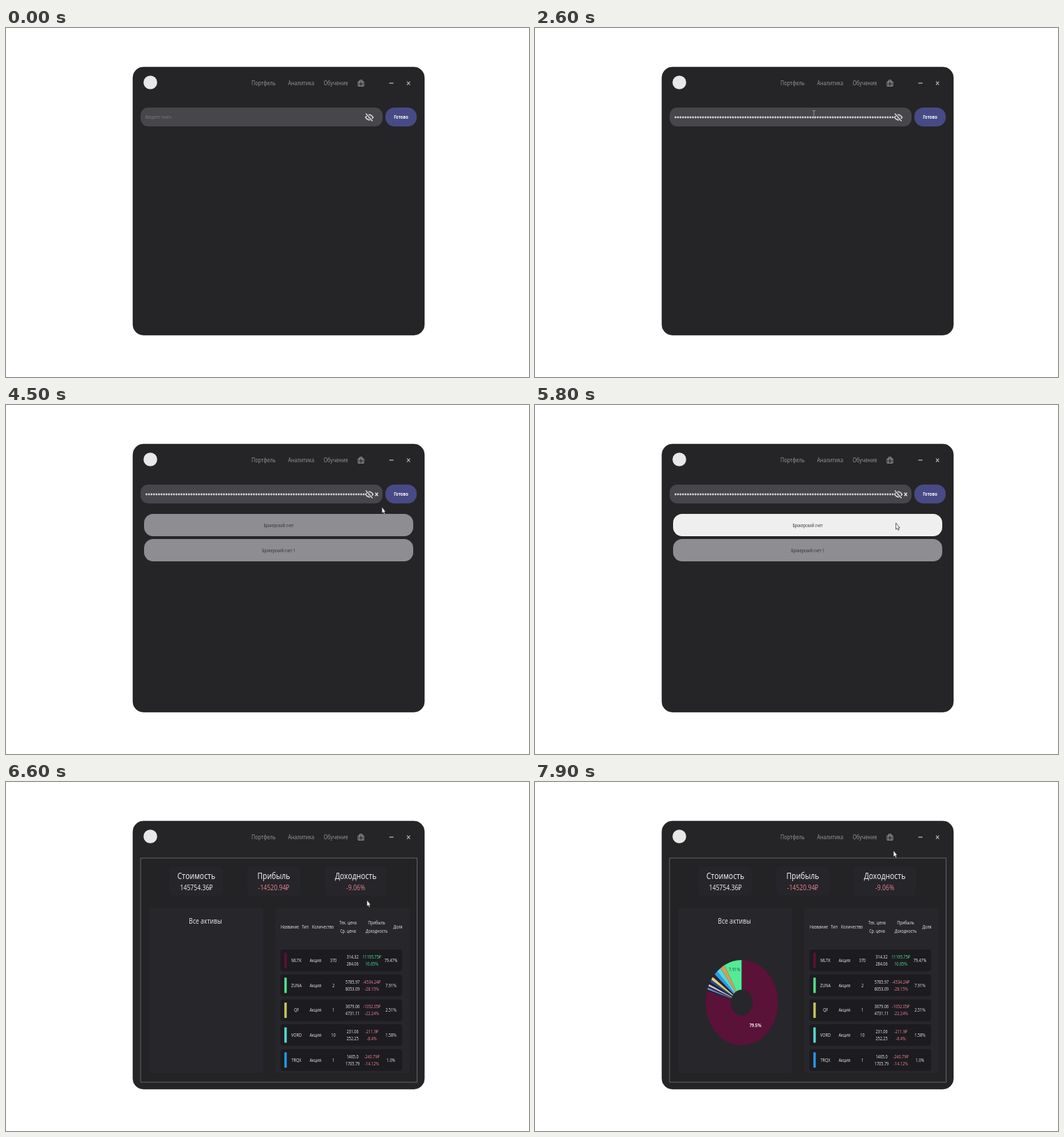
Animation of 750 by 500 pixels, one loop 8 s. Source, as an HTML page:

```html
<!DOCTYPE html>
<html lang="ru">
<head>
<meta charset="utf-8">
<style>
html, body { margin: 0; width: 100%; height: 100%; overflow: hidden; background: #fff; }
svg { display: block; width: 750px; height: 500px; }
text { font-family: "Noto Sans", "Open Sans", sans-serif; }
</style>
</head>
<body>
<svg id="stage" viewBox="0 0 750 500"></svg>
<script>
const SQUEEZE = 0.85; // the whole window is narrowed horizontally
const LOOP = 8000, STEP = 100;
const RED = '#d87f88', GREEN = '#4fd88c', LIGHT = '#dededf';

const text = (x, y, size, fill, str, anchor = 'middle', weight = 400) =>
  `<text transform="translate(${x} ${y}) scale(${SQUEEZE} 1)" font-size="${size}" fill="${fill}"
    text-anchor="${anchor}" font-weight="${weight}">${str}</text>`;
const box = (x, y, w, h, r, fill, extra = '') =>
  `<rect x="${x}" y="${y}" width="${w}" height="${h}" rx="${r}" fill="${fill}" ${extra}/>`;
const line = (d, color, width, extra = '') =>
  `<path d="${d}" fill="none" stroke="${color}" stroke-width="${width}" ${extra}/>`;
const group = (id, body) => `<g id="${id}">${body}</g>`;

function header() {
  const nav = [[352, 'Портфель'], [404.5, 'Аналитика'], [455.5, 'Обучение']];
  return box(182, 56, 418, 384, 15, '#252527', 'stroke="#1b1b1d" stroke-width=".6"') +
    `<circle cx="207" cy="78" r="9.8" fill="#e8e8e8"/>` +
    nav.map(([x, s]) => text(x, 82, 8.4, '#929294', s, 'start')).join('') +
    line('M505 77h8v6.2h-8zM507.3 77v-2.2h3.4v2.2M507.3 77v6M510.7 77v6', '#a0a0a2', 1) +
    line('M549.7 79h6', '#b5b5b7', 1.3) +
    line('M575 76.7l4.4 5M579.4 76.7l-4.4 5', '#b5b5b7', 1.1);
}

function login() {
  const eye = line('M515.5 128q5.5 -7.5 11 0q-5.5 7.5 -11 0z', '#dcdcde', 1.3) +
    `<ellipse cx="521" cy="128" rx="1.7" ry="2" fill="#dcdcde"/>` +
    line('M516.3 122.5l9.6 11', '#47464b', 3) + line('M516 122.5l9.6 11', '#e2e2e4', 1.2);
  return box(193, 114, 347, 27, 11, '#47464b') +
    group('hint', text(199.5, 130.2, 6.2, '#78777c', 'Введите токен', 'start')) +
    group('caret', line('M199.7 123v10', '#c4c4c6', 0.8)) +
    group('token', line('M201.5 128H514.5', '#d6d6d8', 2.8,
      'stroke-linecap="round" stroke-dasharray="0 3.58"')) + eye +
    group('clear', line('M529.5 125.6l4 4.8M533.5 125.6l-4 4.8', '#e8e8ea', 1.4)) +
    box(544, 114, 45, 27, 13, '#484a86', 'id="done"') +
    text(566.5, 130.4, 6.9, '#fff', 'Готово', 'middle', 700);
}

function accounts() {
  return ['Брокерский счет', 'Брокерский счет 1'].map((name, i) =>
    box(198, 156 + 36 * i, 386, 32, 13, '#8e8d91', `id="account${i}"`) +
    text(391, 174.6 + 36 * i, 6.2, '#343437', name)).join('');
}

function table() {
  const heads = [[407, 210, 'Название'], [429, 210, 'Тип'], [454.5, 210, 'Количество'],
    [490.5, 204, 'Тек. цена'], [490.5, 216, 'Ср. цена'],
    [531.5, 204, 'Прибыль'], [531.5, 216, 'Доходность'], [562, 210, 'Доля']];
  const rows = [
    ['#5a1238', 'MLTK', '370', '314.32', '284.06', '11195.75₽', '10.65%', '79.47%'],
    ['#52e58c', 'ZUNA', '2', '5785.97', '8053.09', '-4534.24₽', '-28.15%', '7.91%'],
    ['#c5c860', 'QF', '1', '3679.06', '4731.11', '-1052.05₽', '-22.24%', '2.51%'],
    ['#54dfd0', 'VORD', '10', '231.06', '252.25', '-211.9₽', '-8.4%', '1.58%'],
    ['#2a98e8', 'TRQX', '1', '1465.0', '1705.79', '-240.79₽', '-14.12%', '1.0%']];
  return heads.map(([x, y, s]) => text(x, y, 6.4, LIGHT, s, 'middle', 500)).join('') +
    rows.map(([color, name, count, now, mean, gain, rate, share], i) => {
      const y = 255.5 + 35.7 * i, tone = gain[0] === '-' ? RED : GREEN;
      const cell = (x, dy, s, fill = LIGHT) => text(x, y + dy + 2.4, 6.5, fill, s);
      return box(393.5, y - 15.5, 174.5, 31, 4, '#1c1b20') +
        box(399.2, y - 11, 3.4, 22, 0.5, color) +
        cell(416.5, 0, name) + cell(443.7, 0, 'Акция') + cell(469.5, 0, count) +
        cell(497, -5, now) + cell(497, 5, mean) +
        cell(524.5, -5, gain, tone) + cell(524.5, 5, rate, tone) + cell(552, 0, share);
    }).join('');
}

function pie() {
  const slices = [[7.91, '#52ec96'], [2.1, '#c9a25a'], [1.9, '#54d6e0'], [1.58, '#2f9be6'],
    [1.3, '#2a2233'], [1.2, '#d8cf7a'], [1, '#2c4a8a'], [0.9, '#20202a'], [0.8, '#c9c4dc'],
    [0.7, '#3b2a55'], [0.6, '#5fa8c8'], [0.54, '#1d2440'], [79.47, '#5a1238']];
  let end = 100;
  const arcs = slices.map(([share, color]) => {
    end -= share;
    return `<circle r="39.7" fill="none" stroke="${color}" stroke-width="42.6" pathLength="100"
      stroke-dasharray="${share} ${100 - share}" stroke-dashoffset="${-end}"/>`;
  }).join('');
  return `<g transform="translate(296.5 316) scale(${SQUEEZE} 1) rotate(-90)">${arcs}</g>` +
    text(286, 271, 7, '#285c43', '7.91%') + text(316, 350.6, 7, '#f0e8ec', '79.5%', 'middle', 600);
}

function portfolio() {
  const cards = [[234, 77, 273, 'Стоимость', '145754.36₽', '#e6e6e8'],
    [346, 76, 384, 'Прибыль', '-14520.94₽', RED],
    [457, 89, 501.5, 'Доходность', '-9.06%', RED]];
  return box(193, 109, 396.5, 321, 0, '#232225', 'stroke="#6b6b6d" stroke-width=".9"') +
    cards.map(([x, w, mid, title, value, color]) => box(x, 121, w, 42, 5, '#262529') +
      text(mid, 139, 12.2, '#ececee', title) + text(mid, 155, 10.2, color, value)).join('') +
    box(205, 180, 164, 237, 5, '#27262a') + box(386, 180, 193, 237, 5, '#27262a') +
    text(286, 202.5, 10.1, '#e2e2e4', 'Все активы') + table() + group('pie', pie());
}

document.getElementById('stage').innerHTML = header() + group('login', login()) +
  group('accounts', accounts()) + group('portfolio', portfolio()) +
  group('pointer', `<path d="M0 0V9.2L1.9 7.6L3.2 10.4L4.7 9.7L3.4 7H5.6Z"
    fill="#f6f6f6" stroke="#29292b" stroke-width=".7"/>`) +
  group('beam', line('M-2 -5.5h4M0 -5.5V5M-2 5h4', '#a9a9ac', 0.8));

const el = id => document.getElementById(id);
const show = (id, on) => el(id).setAttribute('visibility', on ? 'visible' : 'hidden');

// time, x, y of the mouse
const path = [[1600, 545, 81], [2000, 400, 124], [2700, 400, 124], [3300, 555, 130],
  [4200, 555, 130], [4500, 539, 146], [4800, 517.5, 169], [7200, 517.5, 169],
  [7700, 530, 122], [7900, 514, 98]];

function mouseAt(t) {
  const i = path.findIndex(p => p[0] > t);
  if (i < 0) return path[path.length - 1].slice(1);
  if (i === 0) return path[0].slice(1);
  const [t0, x0, y0] = path[i - 1], [t1, x1, y1] = path[i];
  const k = (t - t0) / (t1 - t0);
  return [x0 + (x1 - x0) * k, y0 + (y1 - y0) * k];
}

function draw(now) {
  const t = Math.floor(now % LOOP / STEP) * STEP;
  const [x, y] = mouseAt(t);
  const inside = (l, top, r, bottom) => x > l && x < r && y > top && y < bottom;
  const loaded = t >= 6200, typing = !loaded && inside(193, 114, 540, 141);

  show('login', !loaded);
  show('accounts', t >= 4200 && !loaded);
  show('portfolio', loaded);
  show('hint', t < 2600);
  show('caret', t >= 2000 && t < 2600);
  show('token', t >= 2600 && !loaded);
  show('clear', t >= 2700 && !loaded);
  show('pie', t >= 7000);
  show('pointer', t >= 1600 && !typing);
  show('beam', t >= 1600 && typing);
  for (const id of ['pointer', 'beam']) el(id).setAttribute('transform', `translate(${x} ${y})`);

  el('done').setAttribute('fill', inside(544, 114, 589, 141) ? '#98979d' : '#484a86');
  for (const i of [0, 1]) {
    const top = 156 + 36 * i;
    el('account' + i).setAttribute('fill', inside(198, top, 584, top + 32) ? '#efeff0' : '#8e8d91');
  }
  requestAnimationFrame(tick);
}

const start = performance.now();
function tick() { draw(performance.now() - start); }
tick();
</script>
</body>
</html>
```
